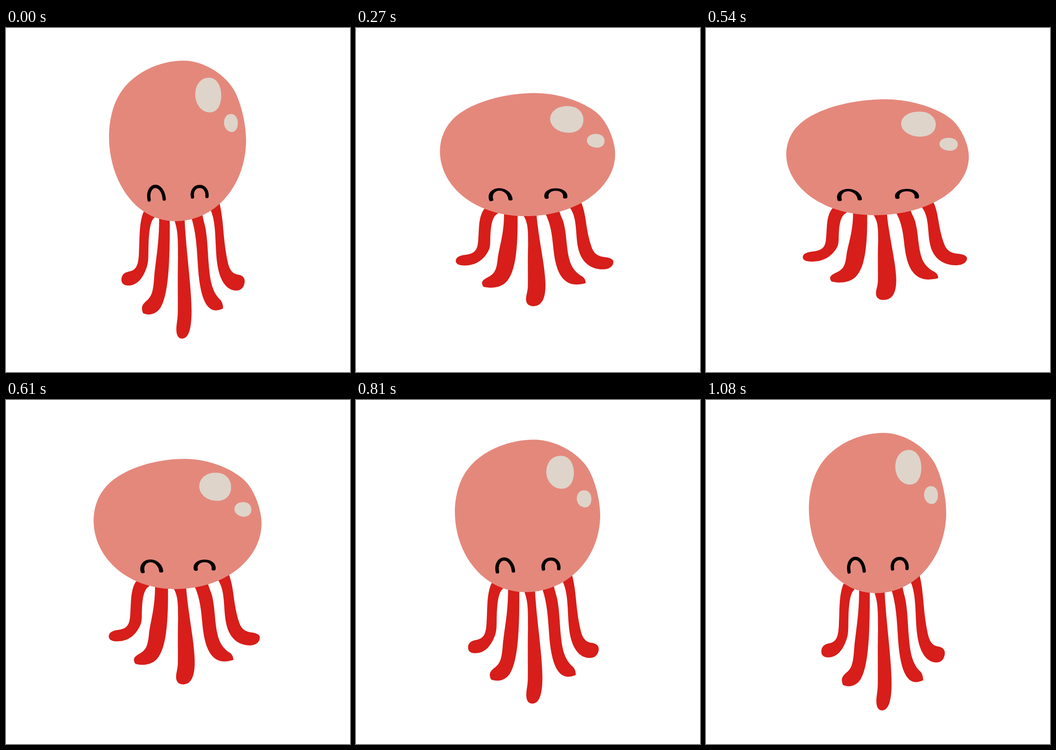
An HTML page for the animation above (1.11 s loop, 748 by 748 pixels).

```html
<!DOCTYPE html>
<html lang="en">
<head>
<meta charset="utf-8">
<title>Jellyfish</title>
<style>
  html, body { margin: 0; width: 100%; height: 100%; overflow: hidden; background: #fff; }
  svg { display: block; width: 100%; height: 100%; }
</style>
</head>
<body>
<svg viewBox="0 0 748 748">
  <g id="jelly">
    <g fill="#d71e1a">
      <path d="M299 400C289 425 291 455 289 490C288 512 285 525 270 529C258 531 251 536 251 547C251 556 257 560 266 560C290 560 301 535 306 520C311 505 309 490 310 470C311 445 313 420 323 412L320 390Z"/>
      <path d="M333 405C334 470 324 510 322 545C320 572 317 582 308 591C298 600 292 605 298 620C308 625 325 625 336 608C353 580 357 510 356 405Z"/>
      <path d="M366 418C374 440 374 460 374 500C373 550 374 590 373.5 620C373 638 370 645 370.5 658C371 670 376 675.5 383 675.5C400 675 403.5 645 403.5 615C403 560 391 480 388 410Z"/>
      <path d="M403 412C413.5 445 415 480 417.5 520C421 570 430 612 455 614C463 614 468 611.5 472 610C472 604 471 597 466 591C457 583 450 570 446 553C439 520 440 480 435.5 447C434 430 429 420 426 400Z"/>
      <path d="M445 396C458 425 454 470 459 510C464 550 480 571 501 571C512 571 519 562 519 550C519 541 511 537 503 536C491 534 485 523 482 508C471 455 474 420 464 380Z"/>
    </g>
    <path fill="#e4887c" d="M386 71C430 71 477 101 497 137C512 165 522 211 522 244C522 340 457 420 369 420C280.5 420 224 331 224 236C224 205 231 173 243 151C267 104 326 71 386 71Z"/>
    <g fill="#ded4ca">
      <path d="M441 108C459 108 468 127 468 147C468 168 459 183.5 443 183.5C424 183.5 411.5 164 411.5 145C411.5 124 423 108 441 108Z"/>
      <path d="M489 187C499 187 504 196 504 207C504 218 499 226 491 226C481 226 474 216 474 206C474 195 480 187 489 187Z"/>
    </g>
    <path fill="none" stroke="#000" stroke-width="7.2" stroke-linecap="round" d="M311.2 374C307.5 354 317 344.3 325 344.3C335 344.3 343 357 344 372M405.5 367.5C403 355 410 344.5 421 344.5C433 344.5 438 356 437 366.5"/>
  </g>
</svg>
<script>
  const LOOP = 1110, STEP = 33.7, HALF = 16.4, CENTER = 373;
  const jelly = document.getElementById("jelly");

  const bezier = (a, b, s) => 3 * a * s * (1 - s) ** 2 + 3 * b * s * s * (1 - s) + s ** 3;

  // Fast start, long settling tail
  function ease(x) {
    let lo = 0, hi = 1;
    for (let i = 0; i < 30; i++) {
      const mid = (lo + hi) / 2;
      if (bezier(0.1, 0.2, mid) < x) lo = mid; else hi = mid;
    }
    return bezier(0.35, 0.91, lo);
  }

  function draw(now) {
    const t = now % LOOP;
    const step = Math.floor((t - t % 10 + 5) / STEP);
    const squash = step < HALF ? ease(step / HALF) : 1 - ease((step - HALF) / HALF);
    const sx = 1 + 0.3335 * squash, sy = 1 - 0.279 * squash;
    jelly.setAttribute("transform",
      `translate(${CENTER} ${CENTER}) scale(${sx} ${sy}) translate(${-CENTER} ${-CENTER})`);
  }

  const start = performance.now();
  function tick() {
    draw(performance.now() - start);
    requestAnimationFrame(tick);
  }
  tick();
</script>
</body>
</html>
```
